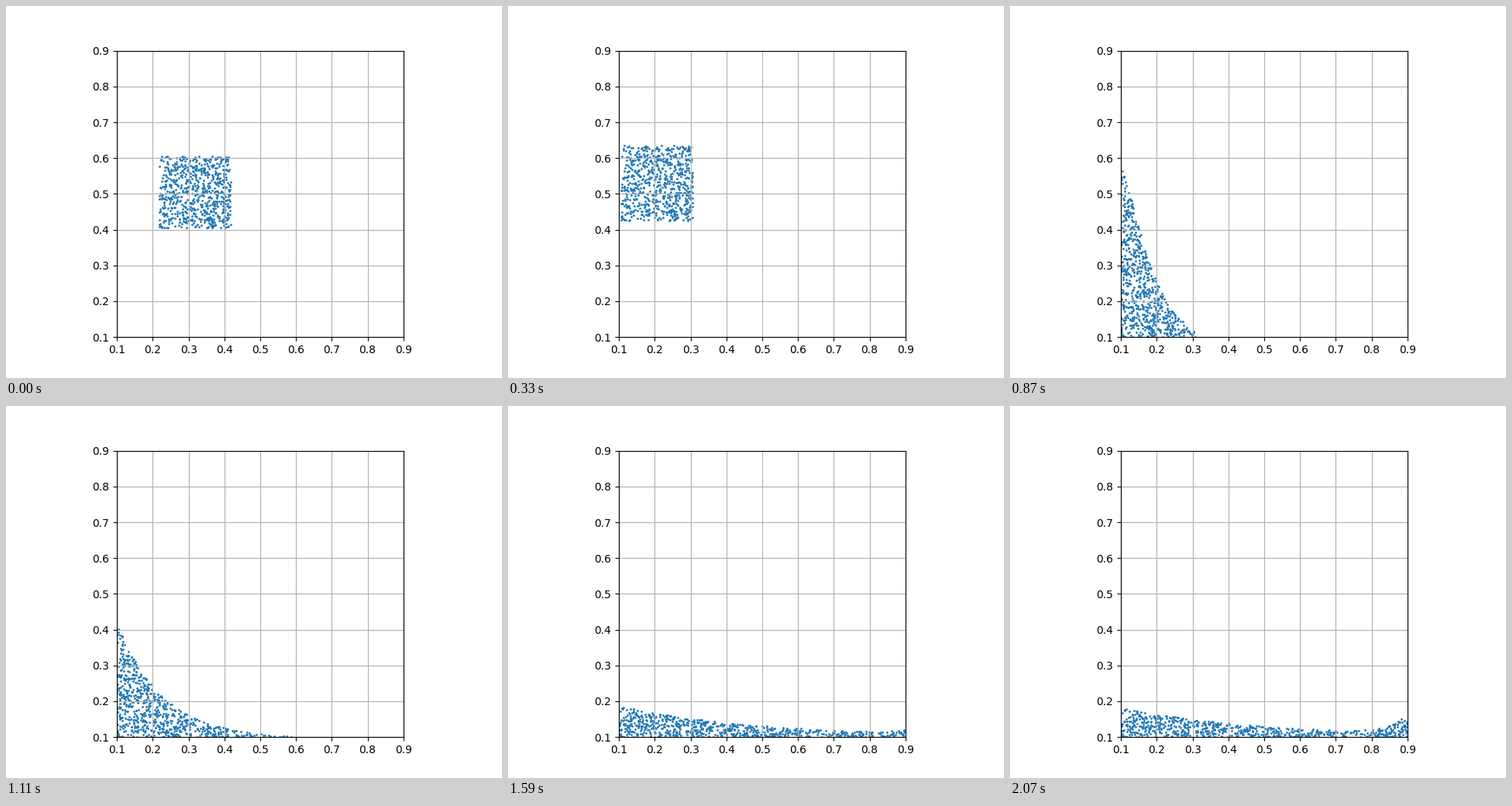
Write a matplotlib script that moves like this. It is 640 by 480 pixels and loops after 2.1 s.

```python
import numpy as np
import matplotlib.pyplot as plt
from matplotlib.animation import FuncAnimation

FRAMES, INTERVAL = 70, 30
COUNT = 700
LO, HI = 0.1, 0.9
HIT, LAND, SETTLE = 11, 24, 29  # wall contact, floor contact, full heap

rng = np.random.default_rng(4)
u, v = rng.random((2, COUNT))


def smooth(t, start, end):
    k = np.clip((t - start) / (end - start), 0, 1)
    return k * k * (3 - 2 * k)


def logistic(t, middle, scale):
    return 1 / (1 + np.exp(-(t - middle) / scale))


def center_y(t):
    return 0.505 + 0.01107 * t - 0.0008 * t**2


def fill(s, bottom, top):
    """Spread the particles evenly between two outlines, column by column."""
    depth = np.maximum(top - bottom, 1e-5)
    area = np.concatenate([[0], np.cumsum(depth[1:] + depth[:-1])])
    col = np.interp(u, area / area[-1], s)
    low, high = np.interp(col, s, bottom), np.interp(col, s, top)
    return np.column_stack([LO + col, low + v * (high - low)])


def flight(t):
    """Square block thrown to the left."""
    x = 0.2175 - 0.0101 * t + 0.2 * u
    y = center_y(t) + (v - 0.5) * (0.2 + 0.0008 * t)
    return np.column_stack([x, y])


def blob(t):
    """Falling block squashed on the wall, with jets up and down along it."""
    k = (t - HIT) / 14
    reach = 0.13 + 0.07 * (1 - k) ** 2
    s = np.linspace(0, reach, 600)
    corner = 4 + 30 * (1 - k) ** 4
    half = (0.103 + 0.03 * k) * np.sqrt(1 - (s / reach) ** corner)
    jet = 0.19 * k**1.2 * np.exp(-s / 0.035)
    mid = center_y(t)
    return fill(s, np.maximum(mid - half - 0.65 * jet, LO),
                mid + half + 1.2 * jet)


def heap(t):
    """Heap sliding off the left wall, then splashing up the right one."""
    reach = np.clip(0.21 + 0.0363 * (t - SETTLE), 0.13, HI - LO)
    s = np.linspace(0, reach, 600)
    height = 0.08 + 0.42 * logistic(-t, -37.7, 3.5)
    length = 0.09 + 0.32 * logistic(t, 43, 2.9)
    power = 1.05 + 0.35 * np.exp((SETTLE - t) / 2)
    rise = np.sin(np.pi / 2 * np.clip((t - 47) / 22, 0, 1))
    splash = 0.055 * rise * np.exp((LO + s - HI) / (0.01 + 0.04 * rise))
    top = LO + height * np.exp(-(s / length) ** power) + splash
    return fill(s, np.full_like(s, LO), top)


def positions(t):
    if t < HIT + 0.5:
        return flight(t)
    if t <= LAND:
        return blob(t)
    if t >= SETTLE:
        return heap(t)
    w = smooth(t, LAND, SETTLE)
    return (1 - w) * blob(t) + w * heap(t)


fig, ax = plt.subplots(figsize=(6.4, 4.8), dpi=100)
ax.set_aspect("equal")
ax.set(xlim=(LO, HI), ylim=(LO, HI))
ticks = np.linspace(LO, HI, 9)
ax.set_xticks(ticks)
ax.set_yticks(ticks)
ax.grid(True)
dots = ax.scatter(*positions(0).T, s=1, color="C0")


def update(frame):
    dots.set_offsets(positions(frame))
    return (dots,)


anim = FuncAnimation(fig, update, frames=FRAMES, interval=INTERVAL,
                     repeat=True, repeat_delay=0)
plt.show()
```
